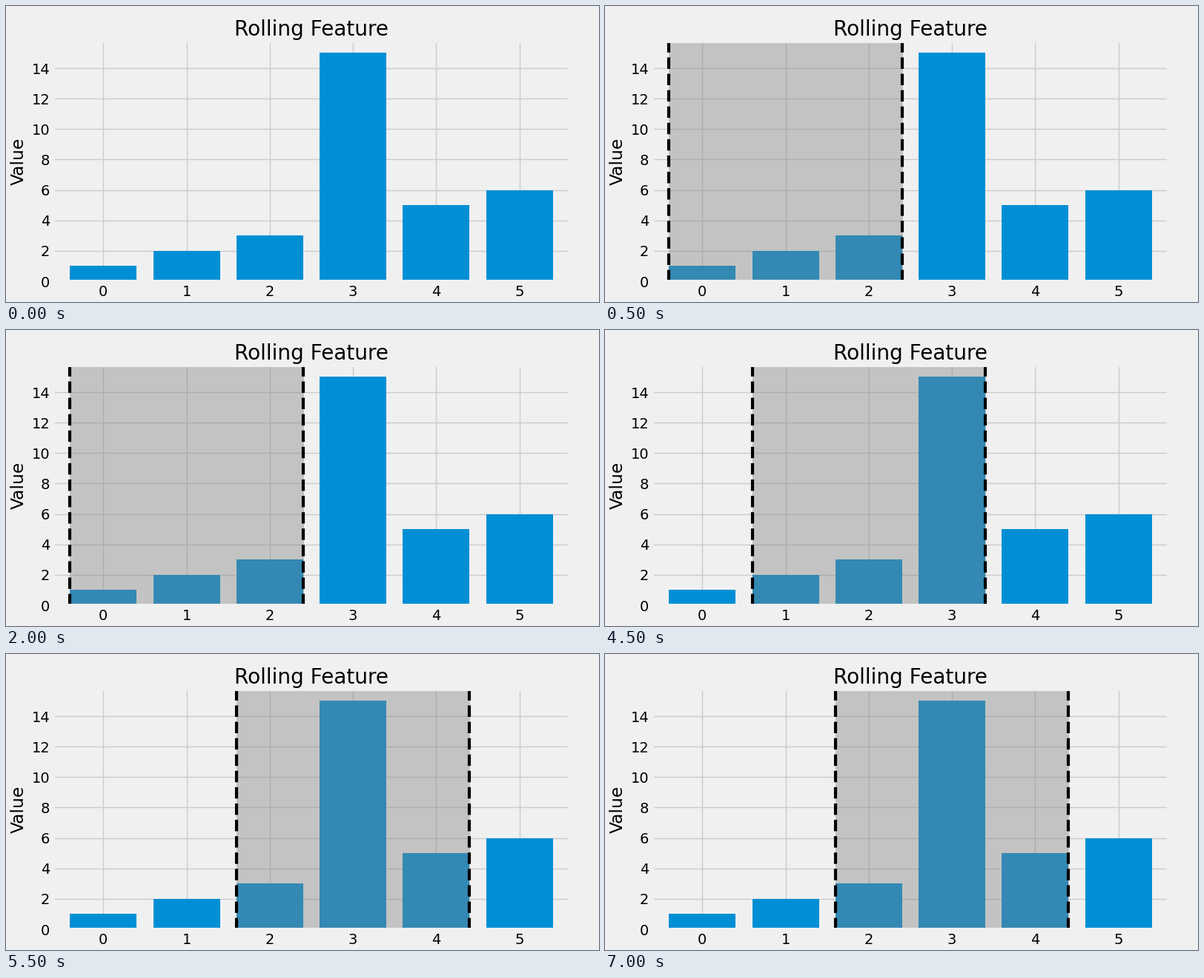
These frames come from a looping animation (800x400 px, 8 s). A matplotlib script:

```python
import matplotlib.pyplot as plt
from matplotlib.animation import FuncAnimation

STEP_MS = 500
FRAMES = 16
HOLD = 5  # steps the window rests at each position
WINDOW = 3
VALUES = [1, 2, 3, 15, 5, 6]

plt.style.use("fivethirtyeight")
plt.rcParams["font.sans-serif"] = ["DejaVu Sans"]

fig, ax = plt.subplots(figsize=(8, 4), dpi=100)
ax.bar(range(len(VALUES)), VALUES)
ax.set_title("Rolling Feature")
ax.set_ylabel("Value")
ax.set_xlim(-0.6, 5.6)
ax.set_ylim(0, 15.75)

span = ax.axvspan(-0.4, WINDOW - 0.6, color="grey", alpha=0.4)
edges = [ax.axvline(0, color="black", linestyle="--", linewidth=3)
         for _ in range(2)]


def update(frame):
    """Jump the window one bar to the right after every hold."""
    visible = frame > 0
    start = max(frame - 1, 0) // HOLD
    left, right = start - 0.4, start + WINDOW - 0.6

    span.set_x(left)
    span.set_width(right - left)
    for line, x in zip(edges, (left, right)):
        line.set_xdata([x, x])
    for artist in (span, *edges):
        artist.set_visible(visible)
    return span, *edges


anim = FuncAnimation(fig, update, frames=FRAMES, init_func=lambda: update(0),
                     interval=STEP_MS, repeat=True, repeat_delay=0, blit=False)
plt.show()
```
